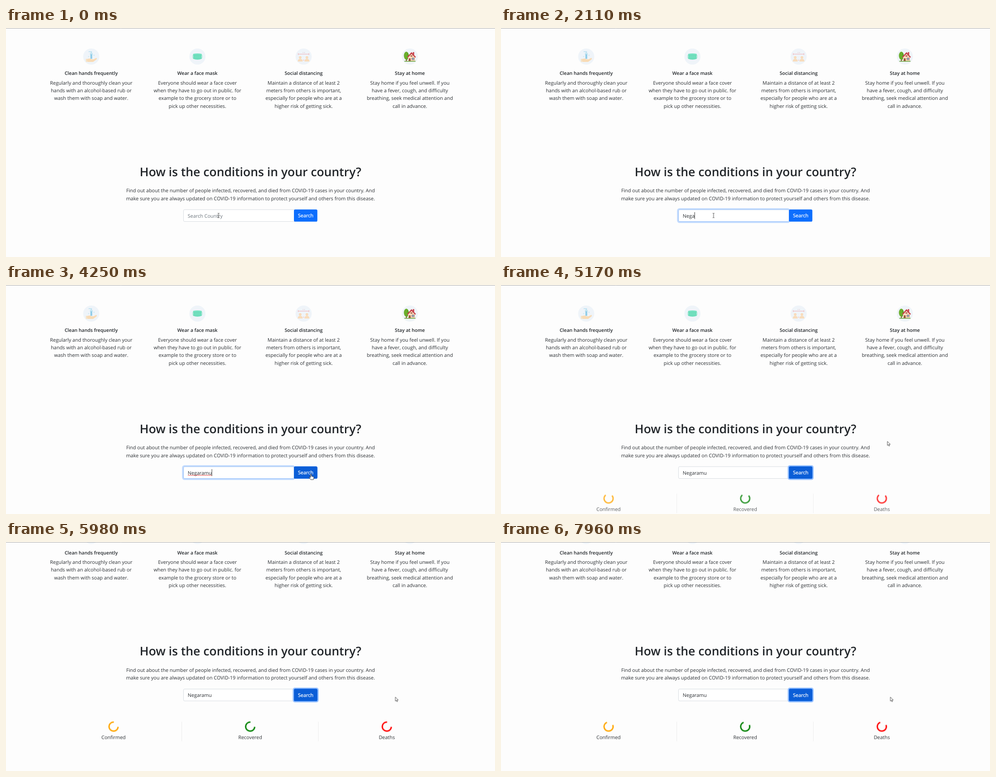
An HTML page that plays this animation: 1092x513 px, repeating every 7990 ms.

```html
<!DOCTYPE html>
<html lang="en">
<head>
<meta charset="utf-8">
<title>Country search</title>
<style>
  html, body { margin: 0; width: 100%; height: 100%; overflow: hidden; background: #fdfdfd; }
  svg { display: block; width: 100%; height: 100%; }
  text { font: 10.94px "Open Sans", "Noto Sans", sans-serif; fill: #2b2f33; text-rendering: geometricPrecision; }
  .mid { text-anchor: middle; }
  .title { font-size: 10.6px; font-weight: 600; fill: #212529; }
  .heading { font-size: 26.8px; font-weight: 600; fill: #212529; }
  .hint { fill: #6c757d; }
  .label { fill: #fff; stroke: #fff; stroke-width: .25; }
  .pale { opacity: .75; }
  .spin { fill: none; stroke-width: 2.88; stroke-dasharray: 3 1; stroke-dashoffset: -.5; }
</style>
</head>
<body>
<svg viewBox="0 0 1092 513">
  <g id="page">
    <g id="cards"></g>

    <g class="pale" transform="translate(190.5 64)">
      <path d="M-3-8h6v4h-6zM-1.500-12h3v4h-3zM-6-12h5v2h-5z" fill="#b5dff0"/>
      <path d="M-2-5h4v10h-4z" fill="#6fbfe2"/>
      <path d="M-12 5h5q4-2 7 1h5l6-3q3 1 0 4l-7 5h-11l-5-2z" fill="#fcd3a0"/>
      <path d="M-12 5h3v7h-3z" fill="#f7deb8"/>
      <circle cx="6" cy="-3" r="1.500" fill="#c5e6f5"/>
      <circle cx="-6" cy="0" r="1.300" fill="#c5e6f5"/>
    </g>
    <g transform="translate(427.500 64)">
      <rect x="-11" y="-4.500" width="22" height="9" rx="3" fill="none" stroke="#a5ead2"/>
      <path d="M-9.500-6q9.500-2 19 0v11q-9.500 4-19 0z" fill="#74e2c1"/>
      <path d="M-9.500-2.500h19M-9.500 1h19M-9.500 4.500h19" stroke="#5dd0ae" stroke-width=".8"/>
    </g>
    <g class="pale" transform="translate(664.500 64)">
      <path d="M-12-5.500H12M-12-7.500v4M12-7.500v4" stroke="#ee9aa0" fill="none"/>
      <path d="M-2-9h1.500M1-9h2" stroke="#d9a7ae"/>
      <g fill="#fbd5a8">
        <circle cx="-7.500" cy="2" r="3"/><path d="M-13 11q0-6 5.500-6t5.500 6z"/>
        <circle cx="7.500" cy="2" r="3"/><path d="M2 11q0-6 5.500-6t5.500 6z"/>
      </g>
      <path d="M-1.500 8h3" stroke="#ee9aa0"/>
    </g>
    <g transform="translate(901.500 64)">
      <path d="M-8.500 2h2v9h-2z" fill="#8a5a33"/>
      <ellipse cx="-7.500" cy="-2" rx="5.500" ry="9" fill="#6aae2c"/>
      <path d="M-5-10q5 8 0 17l-2 0q4-8 2-17z" fill="#4f931f"/>
      <path d="M-4 0L4-8l8 8v11H-4z" fill="#f6dcc0"/>
      <path d="M7-10h3v6h-3zM-6 1L4-10 14 1l-2 1.500L4-6-4 2.500z" fill="#c8414b"/>
      <path d="M-2 4h4v7h-4z" fill="#96513a"/>
      <path d="M5 3h5v4h-5z" fill="#7fb7d8" stroke="#a5523f" stroke-width=".8"/>
      <path d="M2-2.500h4v2.500h-4z" fill="#a5523f"/>
      <path d="M-12 10.500H13" stroke="#5e9a28" stroke-width="1.500"/>
    </g>

    <text class="mid heading" x="546" y="331.500">How is the conditions in your country?</text>
    <text class="mid" x="546" y="368.200">Find out about the number of people infected, recovered, and died from COVID-19 cases in your country. And</text>
    <text class="mid" x="546" y="385.500">make sure you are always updated on COVID-19 information to protect yourself and others from this disease.</text>

    <rect x="396.400" y="406.900" width="250" height="26.600" rx="2.500" fill="#fff" stroke="#ced4da" stroke-width=".8"/>
    <g id="inputFocus" fill="none">
      <rect x="394.600" y="405.100" width="250" height="30.200" rx="4" stroke="#c2dbfe" stroke-width="2.880"/>
      <rect x="396.400" y="406.900" width="246.800" height="26.600" rx="2.500" stroke="#86b7fe" stroke-width=".8"/>
    </g>
    <text id="hint" class="hint" x="405.800" y="424.600">Search Country</text>
    <text id="typed" x="405.800" y="424.800"></text>
    <path id="squiggle" fill="none" stroke="#e8302f" stroke-width=".9"/>
    <path id="caret" d="M.500 412.500v15.500" stroke="#222" stroke-width=".9"/>

    <rect id="buttonFocus" x="640.200" y="403.700" width="58" height="33" rx="5" fill="#98c1fe"/>
    <rect x="643" y="406.500" width="52.300" height="27.300" rx="2.900" fill="#0d6efd"/>
    <rect id="buttonHover" x="643" y="406.500" width="52.300" height="27.300" rx="2.900" fill="#0b5ed7"/>
    <text class="mid label" x="669.200" y="424.400">Search</text>

    <g id="results">
      <path d="M392.500 480v44M697.500 480v44" stroke="#ececec"/>
    </g>
  </g>

  <path d="M0 .5H1092" stroke="#a8a8a8"/>

  <g id="pointer">
    <path id="beam" d="M-2-5h1.500l.5.500.5-.500h1.500M-2 5h1.500l.5-.500.5.500h1.500M0-4.500v9" fill="none" stroke="#333" stroke-width=".9"/>
    <path id="hand" d="M-1 .8q1-1.600 2 0v4l4.500 1.200q1.200.5 1 2l-.9 4.500H-.500L-3.800 8q-.3-1.600 1.300-1.200L-1 8z" fill="#fff" stroke="#222" stroke-width=".9" stroke-linejoin="round"/>
    <path id="arrow" d="M0 0v9.200l2.100-1.900 1.400 3.200 1.500-.7-1.400-3.100h2.900z" fill="#fff" stroke="#222" stroke-width=".8"/>
  </g>
</svg>
<script>
const LOOP = 7990;
const $ = id => document.getElementById(id);

function add(parent, name, attrs, content = '') {
  const el = document.createElementNS('http://www.w3.org/2000/svg', name);
  for (const key in attrs) el.setAttribute(key, attrs[key]);
  el.textContent = content;
  return parent.appendChild(el);
}

const cards = [
  ['Clean hands frequently', 'Regularly and thoroughly clean your', 'hands with an alcohol-based rub or', 'wash them with soap and water.'],
  ['Wear a face mask', 'Everyone should wear a face cover', 'when they have to go out in public. for', 'example to the grocery store or to', 'pick up other necessities.'],
  ['Social distancing', 'Maintain a distance of at least 2', 'meters from others is important,', 'especially for people who are at a', 'higher risk of getting sick.'],
  ['Stay at home', 'Stay home if you feel unwell. If you', 'have a fever, cough, and difficulty', 'breathing, seek medical attention and', 'call in advance.']
];
cards.forEach(([title, ...lines], i) => {
  const x = 190.3 + i * 237.2;
  add($('cards'), 'circle', { cx: x, cy: 64, r: 18, fill: '#eff4f9' });
  add($('cards'), 'text', { class: 'mid title', x, y: 105.2 }, title);
  lines.forEach((line, n) => add($('cards'), 'text', { class: 'mid', x, y: 126.7 + n * 17.28 }, line));
});

const spinners = [['Confirmed', 'orange'], ['Recovered', 'green'], ['Deaths', 'red']].map(([label, stroke], i) => {
  const x = 240.2 + i * 305.1;
  add($('results'), 'text', { class: 'mid', x, y: 518.6 }, label);
  const holder = add($('results'), 'g', { transform: `translate(${x} 491)` });
  return add(holder, 'circle', { class: 'spin', r: 10.08, pathLength: 4, stroke });
});

let wave = 'M406 427';
for (let x = 408; x <= 460; x += 2) wave += `L${x} ${x % 4 ? 427 : 425.8}`;
$('squiggle').setAttribute('d', wave);

const start = document.timeline.currentTime ?? performance.now();

// Each step is [time, properties, easing to the next step]; the ends are held.
function animate(el, ...steps) {
  if (steps[0][0] > 0) steps.unshift([0, steps[0][1]]);
  if (steps.at(-1)[0] < LOOP) steps.push([LOOP, steps.at(-1)[1]]);
  const frames = steps.map(([at, props, easing = 'linear']) => ({ offset: at / LOOP, easing, ...props }));
  el.animate(frames, { duration: LOOP, iterations: Infinity, fill: 'both' }).startTime = start;
}

// Hard on/off switching over [from, to] spans.
function show(el, ...spans) {
  const steps = spans.flatMap(([from, to]) => [[from, { opacity: 1 }, 'step-end'], [to, { opacity: 0 }, 'step-end']]);
  if (steps[0][0] > 0) steps.unshift([0, { opacity: 0 }, 'step-end']);
  animate(el, ...steps);
}

const move = (x, y) => ({ transform: `translate(${x}px, ${y}px)` });
const turn = deg => ({ transform: `rotate(${deg}deg)` });
const CLICK = 4610;

show($('hint'), [0, 1730]);
show($('squiggle'), [3650, CLICK]);
show($('caret'), [690, 1140], [1670, 3620], [4150, CLICK]);
show($('buttonHover'), [3860, 3920], [4130, LOOP]);
show($('beam'), [0, 3860]);
show($('hand'), [3860, 3920], [4130, 4790]);
show($('arrow'), [3920, 4130], [4790, LOOP]);

animate($('inputFocus'), [670, { opacity: 0 }], [760, { opacity: 1 }], [CLICK, { opacity: 1 }], [CLICK + 110, { opacity: 0 }]);
animate($('buttonFocus'), [CLICK, { opacity: 0 }], [CLICK + 110, { opacity: 1 }]);
animate($('results'), [4670, { opacity: 0, ...move(0, -65) }, 'ease'], [5670, { opacity: 1, ...move(0, 0) }]);
animate($('page'), [5730, move(0, 0), 'ease-in-out'], [5950, move(0, -77.5)]);
spinners.forEach(el => animate(el, [CLICK, turn(-724)], [5980, turn(-42)], [LOOP, turn(1030)]));
animate($('pointer'),
  [3620, move(474.6, 420), 'ease-in'], [3860, move(643, 422)], [3920, move(695, 426), 'ease-out'],
  [4010, move(747, 431), 'ease-in'], [4130, move(695, 426), 'ease-out'], [4250, move(681, 423.5)],
  [4700, move(681, 423.5), 'ease-in'], [4790, move(695, 416), 'ease-out'], [5170, move(862.8, 350.3), 'ease-out'],
  [5390, move(869.5, 346.6)], [5730, move(869.5, 346.6)], [5950, move(869.5, 347.3)]);

const word = 'Negaramu';
const keyTimes = [1730, 1890, 2050, 2110, 2310, 2370, 2900, 3090];
function type(now) {
  const t = Math.max(0, now - start) % LOOP;
  const text = word.slice(0, keyTimes.filter(at => at <= t).length);
  if ($('typed').textContent !== text) $('typed').textContent = text;
  const width = text ? $('typed').getComputedTextLength() : 0;
  $('caret').setAttribute('transform', `translate(${405.6 + width} 0)`);
  requestAnimationFrame(type);
}
type(start);
</script>
</body>
</html>
```
